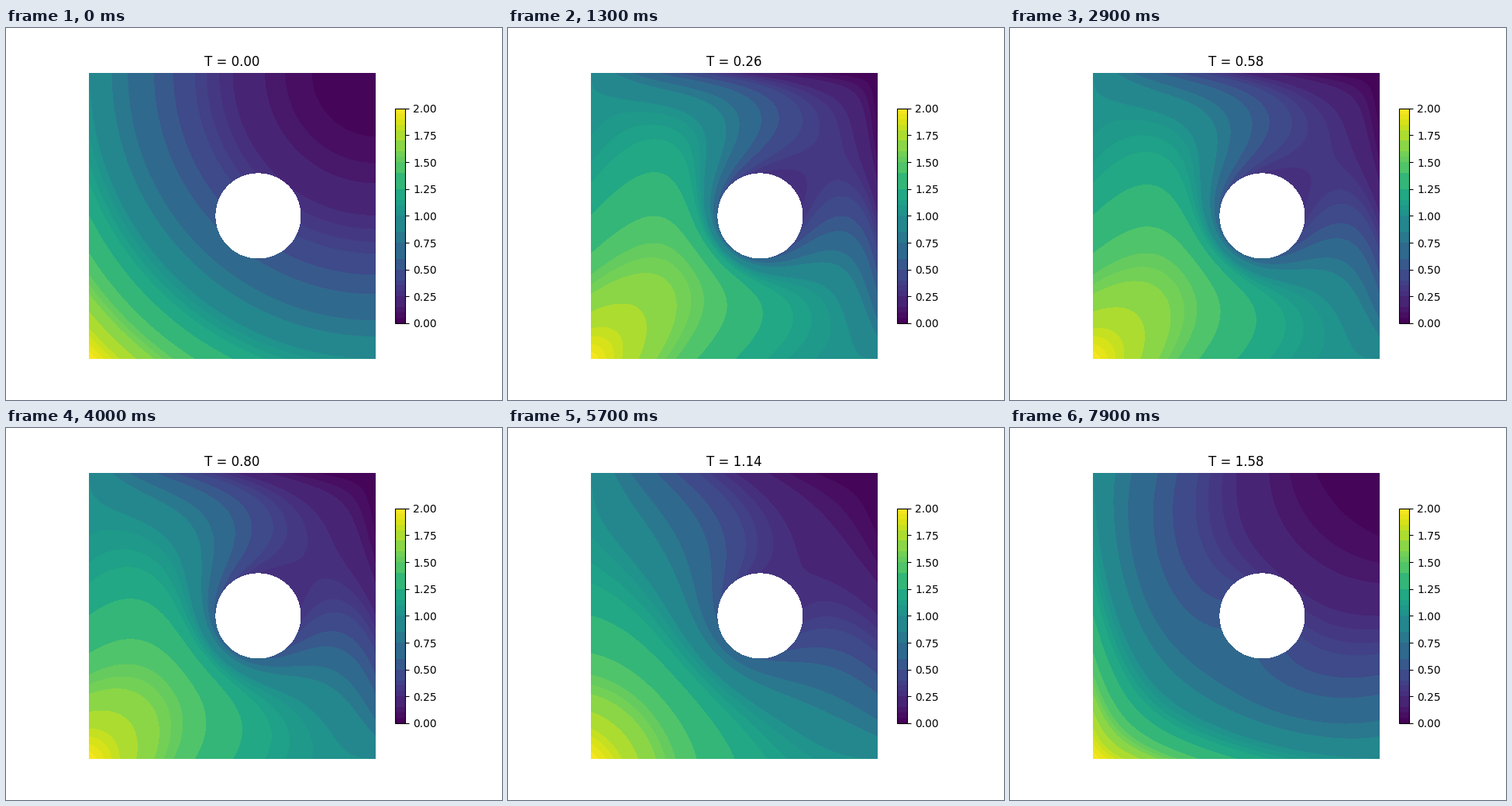
A matplotlib script for the animation above (8 s loop, 640 px wide and 480 px high).

```python
import numpy as np
import matplotlib.pyplot as plt
from matplotlib.animation import FuncAnimation
from matplotlib.colors import BoundaryNorm, ListedColormap

FRAMES, STEP = 80, 0.02
SPEED, OMEGA = 10.0, 1.25
HOLE, RADIUS = (0.5905, 0.5), 0.1475
N = 91

LEVELS = [0, .05, .1, .15, .25, .3, .35, .4, .5, .6, .75, .85, 1,
          1.05, 1.1, 1.15, 1.25, 1.4, 1.5, 1.55, 1.6, 1.7, 1.8,
          1.85, 1.9, 1.95, 2]

axis = np.linspace(0, 1, N)
h = axis[1]
X, Y = np.meshgrid(axis, axis)
BASE = (1 - X) ** 2 + (1 - Y) ** 2
INNER = (slice(1, -1), slice(1, -1))


def arm(dx, dy):
    """Distance to the next node or the hole's rim, in grid steps."""
    px, py = X[INNER] - HOLE[0], Y[INNER] - HOLE[1]
    b = px * dx + py * dy
    c = px ** 2 + py ** 2 - RADIUS ** 2
    disc = b * b - c
    hit = -b - np.sqrt(np.maximum(disc, 0))
    near = (disc > 0) & (hit > 0) & (hit < h)
    return np.where(near, np.maximum(hit / h, 0.1), 1.0)


def solve():
    """Advection-diffusion of the offset from BASE, zero on every boundary."""
    e, w, n, s = arm(1, 0), arm(-1, 0), arm(0, 1), arm(0, -1)
    ce, cw = 2 / (e * (e + w)), 2 / (w * (e + w))
    cn, cs = 2 / (n * (n + s)), 2 / (s * (n + s))
    cc = ce + cw + cn + cs
    sub = int(np.ceil(STEP / (0.24 * h * h)))
    dt = STEP / sub
    fluid = (X - HOLE[0]) ** 2 + (Y - HOLE[1]) ** 2 > RADIUS ** 2
    local = np.minimum(dt, 0.95 * h * h / cc) * fluid[INNER]
    ce, cw, cn, cs = (k * local / h ** 2 for k in (ce, cw, cn, cs))
    keep = 1 - ce - cw - cn - cs
    gx, gy = local / (h * (e + w)), local / (h * (n + s))
    push = 2 * (2 - X - Y)[INNER] * local
    lift = 4 * local

    u = np.zeros((N, N))
    out = [BASE.copy()]
    for i in range((FRAMES - 1) * sub):
        v = SPEED * np.cos(OMEGA * i * dt)
        E, W, No, S = u[1:-1, 2:], u[1:-1, :-2], u[2:, 1:-1], u[:-2, 1:-1]
        u[INNER] = (keep * u[INNER] + ce * E + cw * W + cn * No + cs * S + lift
                    + v * (push - gx * (E - W) - gy * (No - S)))
        if (i + 1) % sub == 0:
            out.append(np.clip(BASE + u, 0, 2))
    return out


fields = solve()

mids = (np.array(LEVELS[:-1]) + LEVELS[1:]) / 2
cmap = ListedColormap(plt.get_cmap("viridis")(mids / 2))
norm = BoundaryNorm(LEVELS, cmap.N)

fig, ax = plt.subplots(figsize=(6.4, 4.8), dpi=100)
ax.set_aspect("equal")
ax.set(xlim=(0, 1), ylim=(0, 1))
ax.axis("off")
bar = fig.colorbar(plt.cm.ScalarMappable(norm, cmap), ax=ax, shrink=0.75,
                   spacing="proportional", ticks=np.arange(0, 2.01, 0.25))
bar.minorticks_off()
bar.ax.yaxis.set_major_formatter("{x:.2f}")
ax.add_patch(plt.Circle(HOLE, RADIUS, fc="white", lw=0, zorder=3,
                        antialiased=False))
title = ax.set_title("")
bands = None


def draw(k):
    global bands
    if bands is not None:
        bands.remove()
    bands = ax.contourf(X, Y, fields[k], LEVELS, cmap=cmap, norm=norm)
    title.set_text(f"T = {k * STEP:.2f}")
    return bands, title


anim = FuncAnimation(fig, draw, frames=FRAMES, interval=100, repeat=True,
                     repeat_delay=0, init_func=lambda: draw(0))
plt.show()
```
